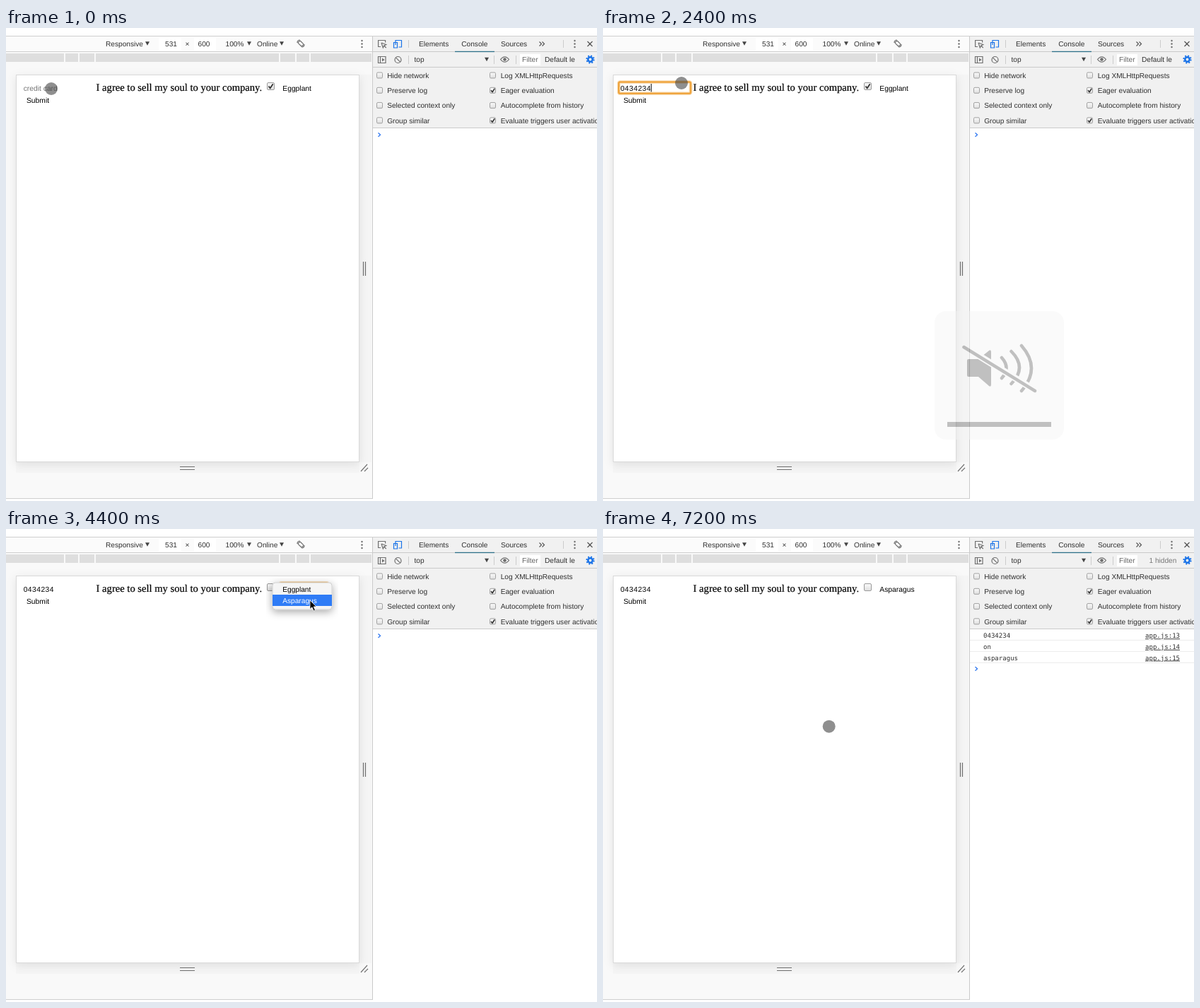
Recreate the animation shown at these times as an HTML page. Size 836 px wide and 670 px high, loop 7300 ms.

```html
<!DOCTYPE html>
<html lang="en">
<head>
<meta charset="utf-8">
<title>Form values in the console</title>
<style>
html, body { margin: 0; width: 100%; height: 100%; overflow: hidden; background: #fff; }
svg { display: block; width: 836px; height: 670px; }
text { font: 10.15px "Liberation Sans", Arial, sans-serif; fill: #303030; white-space: pre; text-rendering: geometricPrecision; }
.form text { font-size: 10.3px; fill: #000; }
.form .serif { font: 14.6px "Liberation Serif", Times, serif; stroke: #000; stroke-width: .2; }
.log text { font: 9.05px "DejaVu Sans Mono", Menlo, monospace; fill: #303030; }
.log .link { text-decoration: underline; }
.line { fill: none; stroke: #6e6e6e; stroke-width: 1.2; }
.ring rect { fill: none; stroke: #efa53f; rx: 2px; }
</style>
</head>
<body>
<svg viewBox="0 0 836 670">
  <defs>
    <linearGradient id="box" x2="0" y2="1"><stop stop-color="#fbfbfb"/><stop offset="1" stop-color="#dedede"/></linearGradient>
    <filter id="shadow" x="-10%" y="-30%" width="120%" height="180%"><feDropShadow dx="0" dy="3" stdDeviation="6" flood-opacity=".35"/></filter>
    <filter id="soft" x="-10%" y="-10%" width="120%" height="120%"><feDropShadow dx="0" dy="3" stdDeviation="6.5" flood-opacity=".1"/></filter>
  </defs>

  <!-- device view -->
  <rect y="12" width="518" height="655" fill="#f9f9f9"/>
  <path d="M500 66h17v549h-17zM14 615h486v15H14z" fill="#f5f5f5"/>
  <rect x="14.5" y="66.5" width="485" height="548" fill="#fff" filter="url(#soft)"/>
  <rect x="14.5" y="66.5" width="485" height="548" fill="none" stroke="#d9d9d9"/>
  <rect y="12" width="518" height="21" fill="#fbfbfb"/>
  <path d="M216 14h32v18h-32zM266 14h31v18h-31z" fill="#fff"/>
  <path d="M0 11.5H836M0 33.5H518M0 666.5H836" stroke="#cfcfcf"/>
  <path d="M0 36h82v12H0zM84 36h18v12H84zM104 36h21v12h-21zM127 36h259v12H127zM388 36h21v12h-21zM411 36h18v12h-18zM431 36h86v12h-86z" fill="#dedede"/>
  <path d="M505.5 331v20M508.5 331v20M246 621.5h21M246 625.5h21M502 628l9-10M507 628l5-5" class="line"/>
  <g id="bar"></g>
  <g class="line" stroke-width="1">
    <rect x="413.2" y="19.8" width="7.600" height="4.400" rx="1" transform="rotate(45 417 22)"/>
    <path d="M412 21q0-4 4-4M422 23q0 4-4 4"/>
  </g>

  <!-- form -->
  <g class="form">
    <text class="serif" x="127.6" y="89">I agree to sell my soul to your company.</text>
    <text x="29" y="106">Submit</text>
    <text id="field" x="24.7" y="88.6"></text>
    <text id="choice" x="391.3" y="88.6"></text>
    <rect id="caret" y="79" width="1" height="11.5"/>
    <rect x="369.5" y="77.5" width="10" height="10" rx="1.5" fill="url(#box)" stroke="#9a9a9a"/>
    <path id="tick" d="M371.5 82.5l2.2 2.7 4-6" fill="none" stroke="#333" stroke-width="1.8"/>
    <g class="ring" id="inputRing"></g>
    <g class="ring" id="selectRing"></g>
  </g>

  <!-- developer panel -->
  <rect x="518" y="12" width="318" height="655" fill="#fff"/>
  <rect x="518" y="12" width="318" height="129" fill="#f1f1f1"/>
  <path d="M518.5 12V667M518 33.5H836M518 55.5H836M518 141.5H836" stroke="#cacaca"/>
  <path d="M569.5 17v11M788.5 17v11M569.5 39v12M690.5 39v12M721.5 39v12" stroke="#ccc"/>
  <rect x="635" y="32.8" width="56" height="1.3" fill="#2d6f88"/>
  <rect x="727" y="37" width="29" height="16" fill="#fff"/>
  <g class="line">
    <path d="M530 26.5h-3.4v-9h10v3M531 21l2.3 7 1.5-3 3 3M534.8 25l3-1.5L531 21"/>
    <path d="M551 24v-6.500h8.500v9.500h-4M548.500 20.500h5v7.500h-5z" stroke="#1a73e8"/>
    <path d="M526.500 40.500h10.500v9h-10.500zM529.500 40v10"/>
    <path d="M532 42.500l3.500 2.500-3.500 2.500z" fill="#6e6e6e" stroke="none"/>
    <circle cx="554.500" cy="45" r="4.500"/><path d="M551.300 41.800l6.400 6.400"/>
    <path d="M699.500 44.500q6-7.500 12 0q-6 7.500-12 0z"/><circle cx="705.500" cy="44.500" r="1.700" fill="#6e6e6e"/>
    <path d="M754.500 19.500l3 3-3 3M758.500 19.500l3 3-3 3M822.500 19l7 7M829.500 19l-7 7" stroke="#555"/>
    <circle cx="826.500" cy="44.500" r="3.200" stroke="#1a73e8" style="stroke-width:2.600"/>
    <circle cx="826.500" cy="44.500" r="5.200" stroke="#1a73e8" style="stroke-width:1.800" stroke-dasharray="2.040"/>
  </g>
  <g id="panel"></g>
  <path id="prompt" d="M526.500 -2.700l3 2.700-3 2.700" fill="none" stroke="#367cf1" stroke-width="1.400"/>
  <g class="log" id="log"></g>

  <!-- mute overlay -->
  <g id="mute">
    <rect x="469" y="401" width="183" height="182" rx="16" fill="#f4f4f4"/>
    <path d="M517 469h14l15-12q3-2 3 2v46q0 4-3 2l-15-13h-14q-2 0-2-2v-21q0-2 2-2z" fill="#6b6b6b"/>
    <path d="M564 467q13 14.500 0 29M577.500 458q23 23 0 46M592 450q28 32 0 64" fill="none" stroke="#6b6b6b" stroke-width="4.500" stroke-linecap="round"/>
    <path d="M510.500 448l100.500 62" stroke="#f4f4f4" stroke-width="4"/>
    <path d="M510.500 455l100.500 62" stroke="#f4f4f4" stroke-width="3"/>
    <path d="M510.500 452l100.500 62" stroke="#6b6b6b" stroke-width="4.500" stroke-linecap="round"/>
    <rect x="487" y="558" width="147" height="7" fill="#6b6b6b"/>
  </g>

  <!-- select menu -->
  <g id="menu">
    <rect x="377" y="76" width="84" height="38" rx="4" fill="#f5f5f5" stroke="#cfcfcf" filter="url(#shadow)"/>
    <rect id="hover" x="377" width="84" height="16" fill="#2f7cf6"/>
    <text class="item" x="391.300" y="88.600">Eggplant</text>
    <text class="item" x="391.300" y="105">Asparagus</text>
  </g>

  <!-- alert -->
  <g id="alert">
    <rect x="213" y="-30" width="408.500" height="127.500" rx="3" fill="#fff" stroke="#bbb" stroke-width=".6" filter="url(#shadow)"/>
    <text x="227" y="8" style="font-size:13.660px;fill:#222">127.0.0.1:5500 says</text>
    <text x="227" y="34.500" style="font-size:12.200px;fill:#555">Submitted the form</text>
    <rect x="548" y="54" width="59" height="29.500" rx="3" fill="#1967e0"/>
    <text x="577.500" y="72.500" text-anchor="middle" style="font-size:11px;fill:#fff">OK</text>
  </g>

  <circle id="touch" r="9" fill="#444" opacity=".6"/>
  <path id="arrow" d="M0 0V12.500L2.900 9.800 5.200 15 7.400 14 5.200 9H9Z" stroke="#fff" stroke-width=".8"/>
</svg>
<script>
const LOOP = 7300, STEP = 100;
const $ = id => document.getElementById(id);
const show = (id, on) => $(id).style.display = on ? '' : 'none';
const text = (x, y, s, attrs = '') => `<text x="${x}" y="${y}" ${attrs}>${s}</text>`;
const drop = (x, y) => `<path d="M${x - 3} ${y - 2.7}h6l-3 5.400z" fill="#444"/>`;
const kebab = x => [18, 22.5, 27].map(y => `<circle cx="${x}" cy="${y}" r="1.200" fill="#6e6e6e"/>`).join('');
const check = (x, y, on) =>
  `<rect x="${x}" y="${y - 4}" width="8" height="8" rx="1.500" fill="url(#box)" stroke="#a0a0a0"/>` +
  (on ? `<path d="M${x + 1.5} ${y}l2 2.300 3.300-5" fill="none" stroke="#333" stroke-width="1.600"/>` : '');
const ring = (x, w) => [[5, .3], [2.6, 1]].map(([s, o]) =>
  `<rect x="${x}" y="76.500" width="${w}" height="16.200" stroke-width="${s}" opacity="${o}"/>`).join('');

$('bar').innerHTML = text(141, 26.3, 'Responsive') + text(225, 26.3, '531') + text(253.5, 26.3, '×') +
  text(271.5, 26.3, '600') + text(310.5, 26.3, '100%') + text(355, 26.3, 'Online') +
  drop(200, 22) + drop(344, 22) + drop(390, 22) + kebab(503.5);

const options = [
  ['Hide network', 'Log XMLHttpRequests'], ['Preserve log', 'Eager evaluation'],
  ['Selected context only', 'Autocomplete from history'], ['Group similar', 'Evaluate triggers user activation']
];
$('panel').innerHTML = text(584, 26, 'Elements') + text(644.3, 26, 'Console') + text(700, 26, 'Sources') +
  text(577.5, 48.3, 'top') + text(730, 48.3, 'Filter', 'style="fill:#666"') + text(762, 48.3, 'Default le', 'id="level"') +
  drop(680, 44.5) + kebab(804.5) +
  options.map((row, i) => row.map((label, j) => {
    const y = 67 + i * 21.3, x = 524.5 + j * 160;
    return check(x, y, j && i % 2) + text(x + 14.7 + j * .5, y + 3.6, label);
  }).join('')).join('');

$('log').innerHTML = ['0434234', 'on', 'asparagus'].map((s, i) => {
  const y = 154.3 + i * 15.6;
  return text(538, y, s) + text(767, y, 'app.js:' + (13 + i), 'class="link"') +
    `<path d="M519 ${Math.round(y + 3) + .5}H836" stroke="#ececec"/>`;
}).join('');
$('inputRing').innerHTML = ring(22.3, 101.7);
$('selectRing').innerHTML = ring(387.5, 68);

// pointer path: time, x, y
const path = [
  [0, 64, 86], [900, 64, 86], [2300, 98, 80], [2400, 111, 78], [2800, 200, 84], [3100, 284, 88],
  [3400, 374, 83], [3700, 426.5, 85.5], [3900, 426.5, 85.5], [4200, 430, 100], [4600, 430, 102],
  [4800, 390, 110], [5200, 60, 110], [5300, 42.5, 107], [5700, 42.5, 107], [5900, 400, 85],
  [6000, 510.5, 69], [6100, 572, 68], [6300, 572, 68], [6400, 450, 160], [6500, 340, 260], [6600, 319.7, 279.7]
];
const keys = [900, 1600, 1800, 1900, 2000, 2100, 2200];

function pointer(t) {
  const i = path.findIndex(p => p[0] > t);
  if (i < 0) return path[path.length - 1].slice(1);
  const [t0, x0, y0] = path[i - 1], [t1, x1, y1] = path[i], k = (t - t0) / (t1 - t0);
  return [x0 + (x1 - x0) * k, y0 + (y1 - y0) * k];
}

function draw(t) {
  const within = (a, b) => t >= a && t < b;
  const typed = '0434234'.slice(0, keys.filter(k => t >= k).length);
  const field = $('field');
  field.textContent = typed || 'credit card';
  field.style.fill = typed ? '#000' : '#757575';
  field.style.letterSpacing = typed ? '.45px' : '0';
  $('choice').textContent = t < 4600 ? 'Eggplant' : 'Asparagus';
  $('caret').setAttribute('x', 24.5 + typed.length * 6.17);
  show('caret', within(200, 600) || within(900, 3000));
  show('inputRing', within(200, 3000));
  show('selectRing', within(3800, 5400));
  show('tick', t < 3400);

  show('mute', within(1100, 2600));
  $('mute').style.opacity = Math.min(1, Math.max(0, (2545 - t) / 345));

  show('menu', within(3900, 4600));
  const second = t >= 4200;
  $('hover').setAttribute('y', second ? 93 : 77);
  document.querySelectorAll('.item').forEach((el, i) => el.style.fill = second === !!i ? '#fff' : '#000');

  show('alert', within(5500, 6300));
  const logged = t >= 6300;
  show('log', logged);
  $('prompt').setAttribute('transform', `translate(0 ${logged ? 198 : 151.3})`);
  const level = $('level');
  level.textContent = logged ? '1 hidden' : 'Default le';
  level.setAttribute('x', logged ? 772.5 : 762);
  level.style.fill = logged ? '#777' : '#303030';

  const native = within(3900, 5400) || within(5500, 6300);
  show('arrow', native);
  show('touch', !native && !within(900, 2300));
  const at = `translate(${pointer(t)})`;
  $('arrow').setAttribute('transform', at);
  $('touch').setAttribute('transform', at);
}

const start = performance.now();
function tick() {
  const t = (performance.now() - start) % LOOP;
  draw(Math.floor(t / STEP) * STEP);
  requestAnimationFrame(tick);
}
tick();
</script>
</body>
</html>
```
